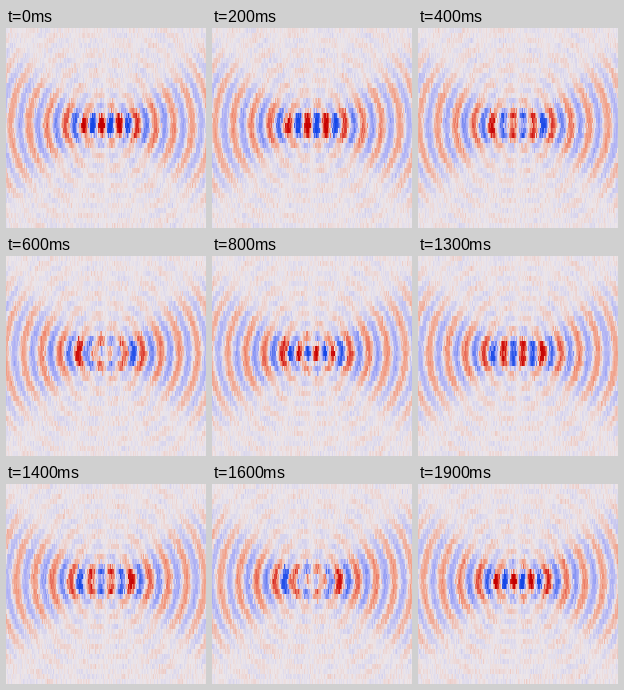
Recreate the animation shown at these times as a matplotlib script. Size 200 by 200 pixels, loop 2000 ms.

```python
import numpy as np
import matplotlib.pyplot as plt
from matplotlib.animation import FuncAnimation
from matplotlib.colors import LinearSegmentedColormap

SIZE, FRAMES, INTERVAL = 200, 20, 100
CENTRE_X, CENTRE_Y = 100, 97
WAVELENGTH, SPACING, SOURCES = 18.2, 8.9, 6
COLS, ROWS = 200, 40

cmap = LinearSegmentedColormap.from_list("field", [
    (0.0, "#1446e6"), (0.1, "#2854ea"), (0.3, "#a8acf6"), (0.5, "#ece6ea"),
    (0.7, "#f29a80"), (0.9, "#d21410"), (1.0, "#c30000")], N=256)


def complex_field():
    """End-fire array: half-wave spacing, alternating sign, rough phase."""
    rng = np.random.default_rng(4)
    x = (np.arange(COLS) + 0.5) * SIZE / COLS
    y = (np.arange(ROWS) + 0.5) * SIZE / ROWS
    x, y = np.meshgrid(x, y)
    x = x + rng.normal(0, 0.6, x.shape)
    y = y + rng.normal(0, 1.2, y.shape)
    k = 2 * np.pi / WAVELENGTH
    field = np.zeros(x.shape, complex)
    for n in range(SOURCES):
        dx = x - CENTRE_X - (n - (SOURCES - 1) / 2) * SPACING
        # each element is a short upright bar
        near = np.hypot(dx, np.maximum(np.abs(y - CENTRE_Y) - 6, 0))
        far = np.hypot(dx, y - CENTRE_Y)
        blend = np.clip(far / 30, 0, 1)
        r = near * (1 - blend) + far * blend
        field += (-1) ** n * np.exp(1j * k * r) / (r + 4) ** 0.62
    field *= 1.03 * np.exp(1j * rng.normal(0, 0.12, x.shape))
    noise = rng.normal(0, 0.035, x.shape) + 1j * rng.normal(0, 0.035, x.shape)
    return field + noise


FIELD = complex_field()

fig = plt.figure(figsize=(2, 2), dpi=100)
ax = fig.add_axes([0, 0, 1, 1])
ax.axis("off")
image = ax.imshow(FIELD.real, cmap=cmap, vmin=-1, vmax=1, aspect="auto",
                  interpolation="nearest", extent=(0, SIZE, SIZE, 0))


def draw(frame):
    phase = 2 * np.pi * frame / FRAMES
    image.set_data((FIELD * np.exp(-1j * phase)).real)
    return [image]


anim = FuncAnimation(fig, draw, frames=FRAMES, interval=INTERVAL,
                     repeat=True, repeat_delay=0)
plt.show()
```
